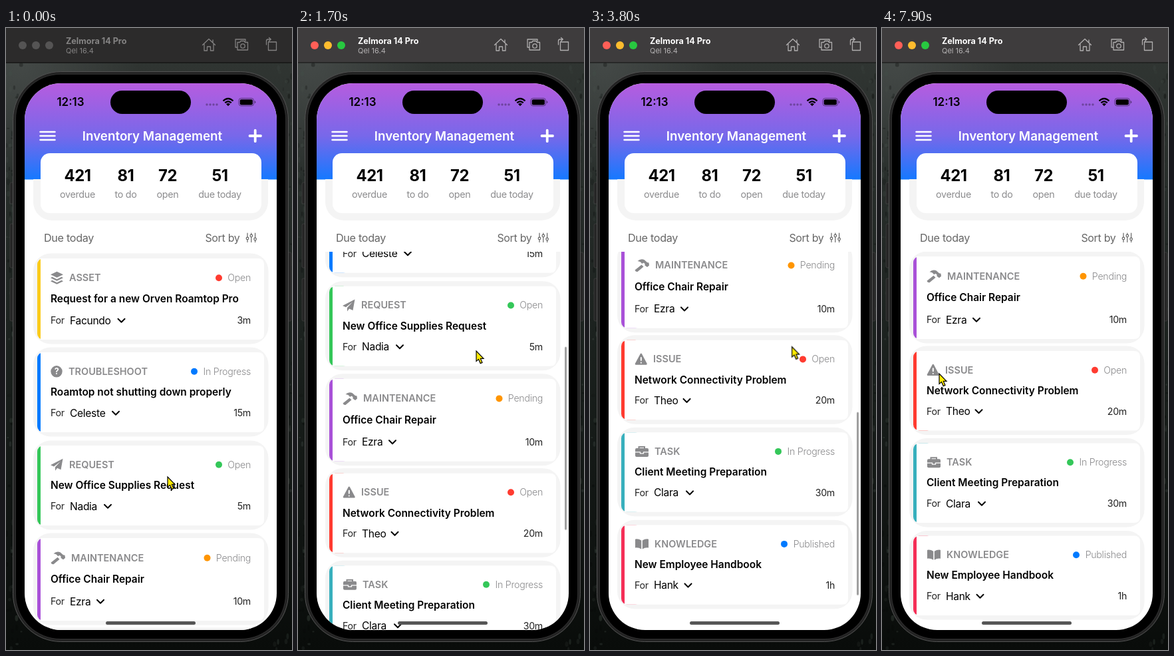
An HTML page for the animation above (8000 ms loop, 430 by 934 pixels).

```html
<!DOCTYPE html>
<html lang="en">
<head>
<meta charset="utf-8">
<title>Inventory Management</title>
<style>
html, body { margin: 0; width: 100%; height: 100%; overflow: hidden; background: #111; }
svg { display: block; }
text { font-family: Inter, Roboto, sans-serif; letter-spacing: -.02em; white-space: pre; }
.bold { font-weight: 700; }
.semi { font-weight: 600; letter-spacing: 0; }
.mid { text-anchor: middle; }
.end { text-anchor: end; }
.line { fill: none; stroke-linecap: round; stroke-linejoin: round; }
.grey { fill: #8a8a8c; }

#idle, #list, #fade, #thumb, #cursor, #touch { animation: 8s linear infinite; }
#idle { animation-name: idle; animation-timing-function: step-end; }
#touch { animation-name: touch; animation-timing-function: step-end; }
#list { animation-name: list; }
#fade { animation-name: fade; }
#thumb { animation-name: thumb; }
#cursor { animation-name: cursor; }

@keyframes idle { 0% { visibility: visible; } 12.5%, 100% { visibility: hidden; } }
@keyframes touch { 0% { visibility: hidden; } 12.5% { visibility: visible; } 20%, 100% { visibility: hidden; } }
@keyframes fade { 0%, 12.5% { opacity: 0; } 13.7%, 91% { opacity: 1; } 95%, 100% { opacity: 0; } }
@keyframes list {
  0%, 12.5% { transform: translateY(0); }
  13.75% { transform: translateY(-15px); }
  20% { transform: translateY(-198px); }
  21.25% { transform: translateY(-239px); animation-timing-function: cubic-bezier(.3, .6, .55, 1); }
  35%, 45.6% { transform: translateY(-443px); animation-timing-function: ease-in-out; }
  52%, 100% { transform: translateY(-423px); }
}
@keyframes thumb {
  0%, 12.5% { transform: translateY(0); }
  13.75% { transform: translateY(7.3px); }
  20% { transform: translateY(96.5px); }
  21.25% { transform: translateY(116px); animation-timing-function: cubic-bezier(.3, .6, .55, 1); }
  35%, 45.6% { transform: translateY(216px); animation-timing-function: ease-in-out; }
  52%, 100% { transform: translateY(206.5px); }
}
@keyframes cursor {
  0% { transform: translate(243px, 674px); animation-timing-function: ease-in-out; }
  11.25%, 12.5% { transform: translate(257px, 690px); }
  13.75% { transform: translate(257px, 676px); }
  20%, 21.25% { transform: translate(268px, 485px); animation-timing-function: ease-out; }
  38.75% { transform: translate(275px, 453px); animation-timing-function: ease-in-out; }
  56.25% { transform: translate(332px, 504px); animation-timing-function: ease-in-out; }
  78.75% { transform: translate(139px, 580px); animation-timing-function: ease-in-out; }
  98.75%, 100% { transform: translate(86px, 519px); }
}
</style>
</head>
<body>
<svg width="430" height="934" viewBox="0 0 430 934">
  <defs>
    <linearGradient id="forest" x2="0" y2="1">
      <stop offset=".05" stop-color="#303532"/>
      <stop offset=".25" stop-color="#272d2a"/>
      <stop offset=".5" stop-color="#1b211e"/>
      <stop offset="1" stop-color="#090c0a"/>
    </linearGradient>
    <radialGradient id="mist" gradientUnits="userSpaceOnUse" cx="20" cy="50" r="180">
      <stop stop-color="#444947"/>
      <stop offset="1" stop-color="#444947" stop-opacity="0"/>
    </radialGradient>
    <linearGradient id="sky" x2="0" y2="1">
      <stop stop-color="#b65cdf"/>
      <stop offset=".55" stop-color="#7768ea"/>
      <stop offset="1" stop-color="#1579ff"/>
    </linearGradient>
    <clipPath id="screen"><rect x="28" y="83" width="379" height="821" rx="55"/></clipPath>
    <clipPath id="view"><rect x="28" y="336" width="379" height="568"/></clipPath>
    <clipPath id="below"><rect x="28" y="227" width="379" height="80"/></clipPath>
  </defs>

  <rect width="430" height="934" fill="url(#forest)"/>
  <rect width="430" height="300" fill="url(#mist)"/>
  <g id="flecks"></g>

  <!-- phone body -->
  <g fill="#262626" stroke="#3e3e3e" stroke-width=".8">
    <rect x="6" y="232" width="7" height="32" rx="2"/>
    <rect x="6" y="294" width="7" height="66" rx="2"/>
    <rect x="6" y="376" width="7" height="64" rx="2"/>
    <rect x="421" y="337" width="8" height="103" rx="2"/>
  </g>
  <rect x="10.5" y="65.5" width="414" height="856" rx="72" fill="#292929" stroke="#505050"/>
  <rect x="12.5" y="67.5" width="410" height="852" rx="70" fill="none" stroke="#1c1c1c"/>
  <rect x="15" y="70" width="405" height="847" rx="67"/>

  <g clip-path="url(#screen)">
    <rect x="28" y="83" width="379" height="821" fill="#fff"/>
    <rect x="28" y="83" width="379" height="144.500" fill="url(#sky)"/>

    <!-- status bar -->
    <text class="semi mid" x="97" y="117" font-size="17">12:13</text>
    <rect x="157" y="94" width="121" height="35" rx="17.500"/>
    <g fill="#000" fill-opacity=".3">
      <circle cx="302" cy="115" r="1.700"/><circle cx="307" cy="115" r="1.700"/>
      <circle cx="312" cy="115" r="1.700"/><circle cx="317" cy="115" r="1.700"/>
    </g>
    <path d="M326.500 109.500Q334 102.500 341.500 109.500M329.300 112.400Q334 108 338.700 112.400" fill="none" stroke="#000" stroke-width="2.300"/>
    <path d="M331 114.200Q334 111.600 337 114.200L334 117.200Z"/>
    <rect x="350" y="105.500" width="22.500" height="11.500" rx="3.500" fill="none" stroke="#000" stroke-opacity=".45"/>
    <rect x="351.700" y="107.200" width="19.200" height="8.200" rx="2"/>
    <path d="M373.800 109v4.500q1.600-.6 1.600-2.200t-1.600-2.300" fill-opacity=".45"/>

    <!-- navigation -->
    <path class="line" stroke="#fff" stroke-width="2.500" d="M51.500 156h22M51.500 162h22M51.500 168h22"/>
    <text class="semi mid" x="220" y="168.500" font-size="18.800" fill="#fff">Inventory Management</text>
    <path class="line" stroke="#fff" stroke-width="3.800" d="M366.500 162h16.500M374.700 153.700v16.500"/>

    <!-- summary -->
    <rect x="41" y="190" width="353" height="99" rx="28" fill="#f4f4f4" clip-path="url(#below)"/>
    <rect x="52" y="188" width="332" height="90" rx="14" fill="#fff"/>
    <g id="stats"></g>

    <text x="57" y="320.500" font-size="16.200" fill="#666">Due today</text>
    <text class="end" x="351.500" y="320.500" font-size="16" fill="#666">Sort by</text>
    <g class="line" stroke="#666" stroke-width="1.200">
      <path d="M363 308v6m0 4v3.500M368.800 308v2m0 4v7.500M374.600 308v7m0 4v2.500"/>
      <circle cx="363" cy="316" r="1.800"/><circle cx="368.800" cy="312" r="1.800"/><circle cx="374.600" cy="317" r="1.800"/>
    </g>

    <g clip-path="url(#view)">
      <g id="list"></g>
      <g id="fade"><rect id="thumb" x="401" y="362.500" width="3" height="275" rx="1.500" fill="#a0a0a0"/></g>
    </g>
    <rect x="150" y="891" width="135" height="5" rx="2.500" fill="#565656"/>
  </g>

  <g id="bar"></g>
  <g id="idle"></g>

  <g id="cursor">
    <circle id="touch" cy="-2" r="20" fill="none" stroke="#000" stroke-width="3"/>
    <path d="M0 0V15.500L3.500 12.400L6.200 18.600L9 17.400L6.400 11.400H11Z" fill="#ffeb00" stroke="#000" stroke-width="1.200"/>
  </g>
</svg>

<script>
const put = (id, html) => document.getElementById(id).innerHTML = html;
const red = '#ff3b30', blue = '#007aff', green = '#34c759', orange = '#ff9500';

// Woodland texture behind the device
let seed = 11;
const rand = () => (seed = seed * 16807 % 2147483647) / 2147483647;
let flecks = '';
for (let i = 0; i < 260; i++) {
  const x = rand() < .5 ? rand() * 26 : 430 - rand() * 26;
  const y = 54 + rand() * 880;
  const tone = rand() < .5 ? '#454f49' : '#060807';
  flecks += `<ellipse cx="${x}" cy="${y}" rx="${1 + rand() * 2}" ry="${1 + rand() * 4}" fill="${tone}" opacity="${.1 + rand() * .3}"/>`;
}
put('flecks', flecks);

const toolbar = (fill, ink, sub, tools, lights) => `
  <rect width="430" height="52" fill="${fill}"/>
  <rect y="51.500" width="430" height="1" fill="#111"/>
  ${lights.map((c, i) => `<circle cx="${25 + i * 20}" cy="26" r="6" fill="${c}"/>`).join('')}
  <text class="bold" x="90" y="24" font-size="12.600" fill="${ink}" style="letter-spacing:0">Zelmora 14 Pro</text>
  <text x="90" y="38" font-size="11" fill="${sub}" style="letter-spacing:0">Qel 16.4</text>
  <g class="line" stroke="${tools}" stroke-width="1.300">
    <path d="M295.500 25.500L305 16.500L314.500 25.500M298 24v10h4.500v-6h5v6h4.500v-10M311 18v4"/>
    <path d="M347.500 29h-2.500v-12h15v2.500M348 21.500h3.500l1.500-2h5l1.500 2h4v11.500h-15.500z"/>
    <circle cx="356" cy="27" r="3.200"/>
    <path d="M394.500 21h12v12.500h-12zM391.500 25v-5.500q0-2.500 2.500-2.500h4M395.500 14.500l2.800 2.500l-2.800 2.500"/>
  </g>`;
put('bar', toolbar('#3e3c3d', '#fff', '#b4b2b3', '#b0aeaf', ['#ff5f57', '#febc2e', '#28c840']));
put('idle', toolbar('#2c2b2b', '#858484', '#858484', '#828181', Array(3).fill('#555454')));

put('stats', [[107.5, 421, 'overdue'], [180, 81, 'to do'], [243, 72, 'open'], [321.5, 51, 'due today']]
  .map(([x, n, label]) => `
    <text class="bold mid" x="${x}" y="230" font-size="23.800">${n}</text>
    <text class="mid" x="${x}" y="255" font-size="14.300" fill="#8c8c8e">${label}</text>`).join(''));

// Icons are centred on y = 0
const icons = {
  ASSET: `<path d="M76.500-9.500L86-5L76.500-.5L67-5Z"/>
    <path d="M69.500-1.500L76.500 2L83.500-1.500L86 0L76.500 4.500L67 0ZM69.500 3.500L76.500 7L83.500 3.500L86 5L76.500 9.500L67 5Z"/>`,
  TROUBLESHOOT: `<circle cx="76" r="8.700"/><text class="bold mid" x="76" y="4.500" font-size="12.500" fill="#fff">?</text>`,
  REQUEST: `<path d="M85.500-9L82.500 7.500L77 5L74 9V3.500L82-5L72 2.700L67 .5Z"/>`,
  MAINTENANCE: `<path d="M71.500-6.500Q76-10.500 81.500-8.500L86-4.500L88.500-4L89 0L86 2.500L82.500 0V-2.500L80.500-4L78-2.500Q76.500-6 71.500-6.500Z"/>
    <path d="M77.500-1L80.500 2L71.500 9.500Q68.500 10 67.500 7Z"/>`,
  ISSUE: `<path d="M76.800-7.500L84.500 7H69Z" stroke="#8a8a8c" stroke-width="2.500" stroke-linejoin="round"/>
    <path class="line" stroke="#fff" stroke-width="2" d="M76.800-2.500v4M76.800 5.200v.1"/>`,
  TASK: `<path d="M73.500-4V-7h8.500v3" fill="none" stroke="#8a8a8c" stroke-width="2"/>
    <rect x="68" y="-5" width="20" height="13" rx="2"/>
    <path d="M68 1h7.500v2h5V1H88" fill="none" stroke="#fff" stroke-width="1.200"/>`,
  KNOWLEDGE: `<path d="M77.200-5.500Q73.500-8 68.500-7.500Q68-7.500 68 -7V5.500Q73.500 5 77.200 7.500ZM78.800-5.500Q82.500-8 87.500-7.500Q88-7.500 88-7V5.500Q82.500 5 78.800 7.500Z"/>`
};

// top, height, kind, label x, accent, status, dot x, dot colour, title, person, chevron x, age
const cards = [
  [346, 122, 'ASSET', 95, '#fbcb1b', 'Open', 320, red, 'Request for a new Orven Roamtop Pro', 'Facundo', 173.5, '3m'],
  [487, 120, 'TROUBLESHOOT', 94, blue, 'In Progress', 283, blue, 'Roamtop not shutting down properly', 'Celeste', 165, '15m'],
  [627, 120, 'REQUEST', 95, green, 'Open', 320, green, 'New Office Supplies Request', 'Nadia', 153, '5m'],
  [766, 124, 'MAINTENANCE', 98, '#a951d8', 'Pending', 302.5, orange, 'Office Chair Repair', 'Ezra', 142, '10m'],
  [908, 119.5, 'ISSUE', 95, red, 'Open', 320, red, 'Network Connectivity Problem', 'Theo', 145.5, '20m'],
  [1046.5, 119.5, 'TASK', 97, '#38b0bd', 'In Progress', 283, green, 'Client Meeting Preparation', 'Clara', 150, '30m'],
  [1185.5, 119.5, 'KNOWLEDGE', 97, '#f52f57', 'Published', 292, blue, 'New Employee Handbook', 'Hank', 147.5, '1h']
];

const card = ([top, h, kind, labelX, accent, status, dotX, dot, title, person, chevX, age]) => {
  const head = h * .24, foot = h - 29;
  return `<g transform="translate(0 ${top})">
    <rect x="41" y="-7.500" width="353.500" height="${h + 14}" rx="26" fill="#f4f4f4"/>
    <rect x="47" width="30" height="${h}" rx="9" fill="${accent}"/>
    <path d="M52 0H379q9 0 9 9V${h - 9}q0 9-9 9H52Z" fill="#fff"/>
    <g class="grey" transform="translate(0 ${head})">${icons[kind]}</g>
    <text class="semi grey" x="${labelX}" y="${head + 5}" font-size="14.500">${kind}</text>
    <circle cx="${dotX}" cy="${head}" r="5" fill="${dot}"/>
    <text class="end grey" x="368" y="${head + 5}" font-size="14.200" font-weight="300">${status}</text>
    <text class="semi" x="67" y="${h / 2 + 5.2}" font-size="15.430">${title}</text>
    <text x="67" y="${foot + 5}" font-size="14.200" fill="#222">For</text>
    <text x="96" y="${foot + 5.5}" font-size="15.600">${person}</text>
    <path class="line" stroke="#000" stroke-width="2" d="M${chevX - 5} ${foot - 2.3}l5 5l5-5"/>
    <text class="end" x="368" y="${foot + 5}" font-size="14.200" fill="#222">${age}</text>
  </g>`;
};
put('list', cards.map(card).join(''));
</script>
</body>
</html>
```
